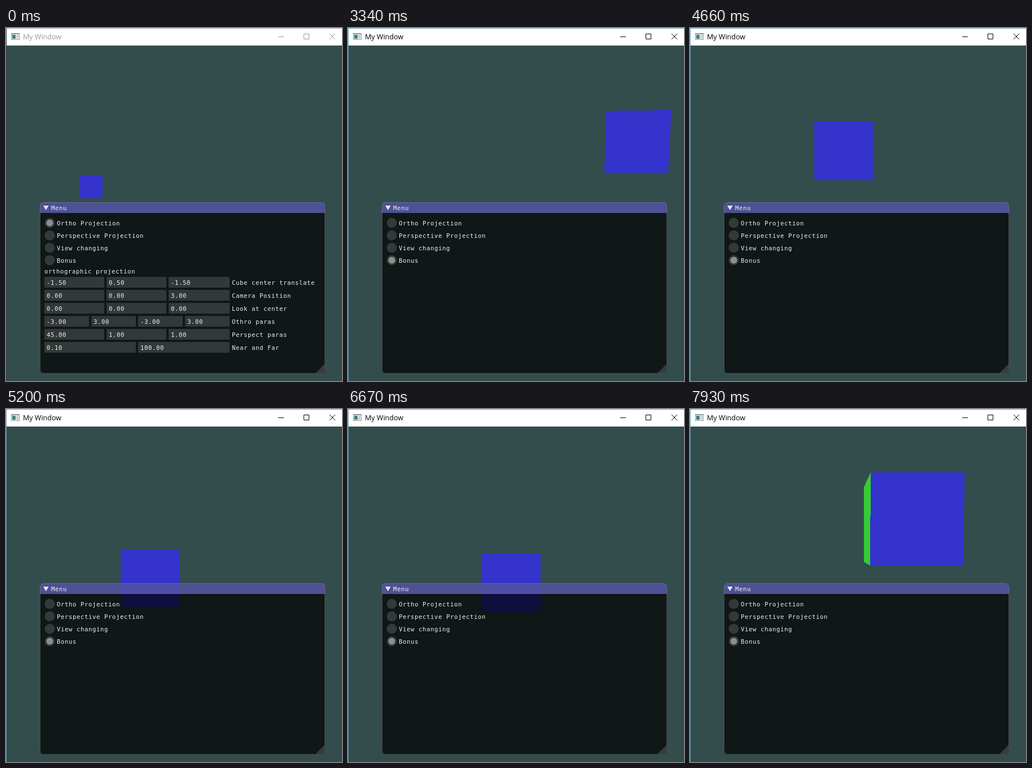
Recreate the animation shown at these times as an HTML page. Size 595 by 624 pixels, loop 8 s.

```html
<!DOCTYPE html>
<html lang="en">
<head>
<meta charset="utf-8">
<title>My Window</title>
<style>
  html, body { margin: 0; width: 100%; height: 100%; overflow: hidden; background: #334d4d; }
  svg { display: block; width: 595px; height: 624px; }
  .ui text { font: 10.6px "DejaVu Sans Mono", monospace; letter-spacing: .62px; fill: #f0f0f0; white-space: pre; }
  .caption { font: 12.5px "Open Sans", sans-serif; }
  .frame { fill: rgba(110,110,110,.39); }
  .hover { fill: rgba(120,120,176,.4); }
</style>
</head>
<body>
<svg viewBox="0 0 595 624">
  <rect width="595" height="624" fill="#334d4d"/>
  <g shape-rendering="crispEdges">
    <polygon id="side" fill="#33cc33"/>
    <polygon id="face" fill="#3333cc"/>
  </g>

  <rect width="595" height="31" fill="#fff"/>
  <path id="topEdge" d="M0 .5H595" fill="none"/>
  <path id="leftEdge" d="M.5 1V624" fill="none"/>
  <g shape-rendering="crispEdges">
    <rect x="9" y="9" width="15" height="12" fill="#8d9499"/>
    <rect x="10" y="11" width="13" height="9" fill="#f4f6f7"/>
    <rect x="11" y="12" width="6" height="7" fill="#3f8087"/>
    <rect x="18" y="12" width="4" height="7" fill="#c9d0d4"/>
  </g>
  <text id="caption" class="caption" x="30" y="20">My Window</text>
  <path id="buttons" d="M482 15.5H492M527.5 10.5H536.5V19.5H527.5ZM573 10L583 20M583 10L573 20" fill="none"/>

  <g class="ui">
    <path d="M60 327H565V604Q565 611 558 611H67Q60 611 60 604Z" fill="rgba(0,0,0,.7)"/>
    <path d="M60 327V315Q60 308 67 308H558Q565 308 565 315V327Z" fill="rgba(82,82,161,.87)"/>
    <path d="M548 610L564 594V604Q564 610 558 610Z" fill="rgba(255,255,255,.16)"/>
    <rect x="60.5" y="308.5" width="504" height="302" rx="7" fill="none" stroke="rgba(128,128,128,.5)"/>
    <path d="M66 314H75.5L70.75 322Z" fill="#e6e6e6"/>
    <text x="80" y="322">Menu</text>
    <g id="radios"></g>
    <circle id="mark" cx="77.5" r="6" fill="rgba(230,230,230,.5)"/>
    <g id="fields"></g>
  </g>

  <path id="cursor" d="M.5 .5V16.5L4.3 13L6.6 18.4L9 17.4L6.7 12.2H11.5Z" fill="#fff" stroke="#000"/>
</svg>
<script>
const LOOP = 8000, STEP = 74, PHASE = 10;
const ENTER = 80, CLICK = 1130, SWITCH = 1290, LEAVE = 2440, APPEAR = 3192;
const $ = id => document.getElementById(id);
const clamp = v => Math.min(1, Math.max(0, v));

function add(parent, tag, attrs, text) {
  const el = document.createElementNS("http://www.w3.org/2000/svg", tag);
  for (const name in attrs) el.setAttribute(name, attrs[name]);
  if (text) el.textContent = text;
  parent.append(el);
  return el;
}

const modes = ["Ortho Projection", "Perspective Projection", "View changing", "Bonus"];
const radioY = i => 344.5 + 22 * i;
const radios = modes.map((name, i) => {
  add($("radios"), "text", { x: 90, y: radioY(i) + 4.5 }, name);
  return add($("radios"), "circle", { cx: 77.5, cy: radioY(i), r: 9 });
});

const rows = {
  "Cube center translate": "-1.50 0.50 -1.50",
  "Camera Position": "0.00 0.00 3.00",
  "Look at center": "0.00 0.00 0.00",
  "Othro paras": "-3.00 3.00 -3.00 3.00",
  "Perspect paras": "45.00 1.00 1.00",
  "Near and Far": "0.10 100.00"
};
add($("fields"), "text", { x: 68, y: 434 }, "orthographic projection");
Object.entries(rows).forEach(([label, line], r) => {
  const values = line.split(" "), last = values.length - 1;
  const y = 440 + 23 * r;
  const width = Math.floor((328 - 4 * last) / values.length);
  values.forEach((value, i) => {
    const x = 68 + i * (width + 4);
    add($("fields"), "rect", { class: "frame", x, y, width: i < last ? width : 396 - x, height: 19 });
    add($("fields"), "text", { x: x + 4, y: y + 14 }, value);
  });
  add($("fields"), "text", { x: 400, y: y + 14 }, label);
});

// Turning points of the cube's upper left corner: screen step, x, y
const turns = [
  [0, 545, 276], [2, 457, 145], [5, 426, 52], [11, 393, 118], [13, 351, 131],
  [22, 155, 182], [27, 203, 248], [33, 264, 190], [40, 186, 141], [47, 237, 255],
  [54, 213, 191], [61, 162, 108], [64, 320, 112]
];

function cornerAt(step) {
  const i = Math.max(1, turns.findIndex(turn => turn[0] >= step));
  const [s0, x0, y0] = turns[i - 1], [s1, x1, y1] = turns[i];
  const k = (step - s0) / (s1 - s0);
  return [x0 + (x1 - x0) * k, y0 + (y1 - y0) * k];
}

function poseAt(time) {
  if (time < SWITCH) return { x: 131, y: 261, w: 40, h: 40, lean: 0, depth: 0 };
  if (time < APPEAR) return { x: 0, y: 0, w: 0, h: 0, lean: 0, depth: 0 };
  const step = Math.floor((time - APPEAR) / STEP);
  const [x, y] = cornerAt(step);
  // The face leans and widens off centre, and grows as the camera walks up to it.
  const lean = .028 * Math.max(0, x - 245);
  const size = 104 + 58 * clamp((step - 55) / 6);
  const depth = 12 * clamp((step - 61) / 3) ** 2;
  return { x, y, w: size + 2 * lean, h: size + 1.2 * lean, lean, depth };
}

function drawCube({ x, y, w, h, lean, depth }) {
  const low = x - lean / 2, base = y + h;
  const top = y + Math.max(0, lean * .3 - depth);
  $("face").setAttribute("points", [x, top, x + w, y, x + w - lean, base, low, base].join(" "));
  $("side").setAttribute("points",
    [x, top, x - depth, y + 2.17 * depth, x - depth, base - depth / 2, low, base].join(" "));
}

// The pointer rests on Bonus, then moves up across the radios above it.
function hoveredAt(time) {
  if (time < CLICK) return -1;
  if (time < LEAVE) return 3;
  const step = Math.floor((time - LEAVE) / STEP);
  return step === 1 || step === 2 ? 3 - step : -1;
}

function drawCursor(time) {
  const shown = time >= ENTER && time < SWITCH;
  $("cursor").style.display = shown ? "" : "none";
  const tick = PHASE + STEP * Math.floor((time - PHASE) / STEP);
  const left = (1 - clamp((tick - ENTER) / 818)) ** 1.7;
  const x = Math.round(82 + 407 * left), y = Math.round(411 + 199 * left);
  $("cursor").setAttribute("transform", `translate(${x} ${y})`);
}

function render(time) {
  const active = time >= CLICK, bonus = time >= SWITCH;
  const ink = active ? "#000" : "#999";
  const hovered = hoveredAt(time);
  $("topEdge").setAttribute("stroke", active ? "#6ba3ba" : "#a8a8a8");
  $("leftEdge").setAttribute("stroke", active ? "#6ba3ba" : "#2b3338");
  $("caption").setAttribute("fill", ink);
  $("buttons").setAttribute("stroke", ink);
  radios.forEach((dot, i) => dot.setAttribute("class", i === hovered ? "hover" : "frame"));
  $("mark").setAttribute("cy", radioY(bonus ? 3 : 0));
  $("fields").style.display = bonus ? "none" : "";
  drawCube(poseAt(time));
  drawCursor(time);
}

const start = performance.now();
function loop(now) {
  render(Math.max(0, now - start) % LOOP);
  requestAnimationFrame(loop);
}
render(0);
requestAnimationFrame(loop);
</script>
</body>
</html>
```
